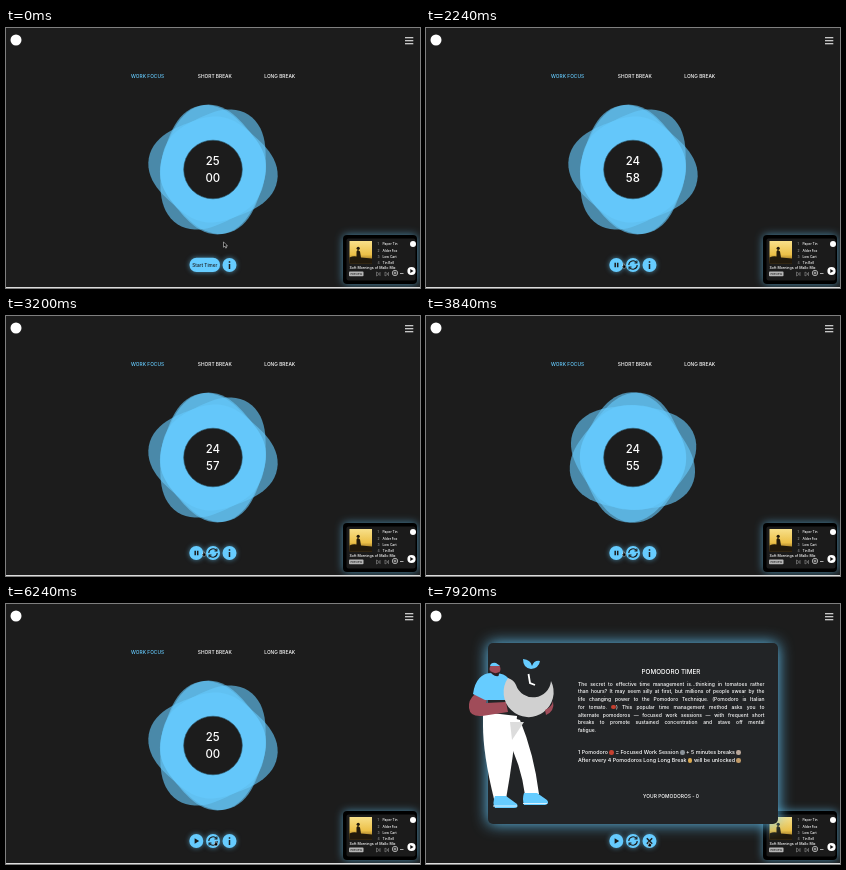
Recreate the animation shown at these times as an HTML page. Size 414x260 px, loop 8 s.

```html
<!DOCTYPE html>
<html lang="en">
<head>
<meta charset="utf-8">
<title>Pomodoro timer</title>
<style>
html, body { margin: 0; width: 100%; height: 100%; overflow: hidden; background: #1c1c1c; }
svg { position: absolute; left: 0; top: 0; }
text, #modal { font-family: Inter, "Open Sans", sans-serif; font-weight: 500; }
.glow { filter: drop-shadow(0 0 2.5px rgba(102, 204, 255, .6)); }
#modal {
  position: absolute; left: 62px; top: 39px; width: 290px; height: 181px; border-radius: 5px;
  background: #222426; color: #fff; box-shadow: 0 0 15px rgba(102, 204, 255, .95);
}
#modal div { position: absolute; white-space: nowrap; }
#modal p { margin: 0; height: 7.7px; text-align-last: justify; }
#modal p:last-child { text-align-last: left; }
#copy { left: 90px; top: 37.8px; width: 186.5px; font-size: 5px; line-height: 7.7px; }
#rules { left: 90px; top: 106.3px; font-size: 5.35px; line-height: 7.7px; }
.mid { left: 90px; width: 186px; text-align: center; }
i { display: inline-block; width: 4.6px; height: 4.4px; border-radius: 50%; vertical-align: -.5px; }
</style>
</head>
<body>
<svg width="414" height="260" viewBox="0 0 414 260">
  <defs>
    <linearGradient id="dusk" x2="0" y2="1">
      <stop offset="0" stop-color="#f8e08a"/><stop offset=".6" stop-color="#ecc048"/><stop offset="1" stop-color="#6b4a12"/>
    </linearGradient>
    <filter id="halo" x="-30%" y="-40%" width="160%" height="180%"><feGaussianBlur stdDeviation="4"/></filter>
  </defs>

  <circle cx="10" cy="12" r="5.5" fill="#fff"/>
  <path d="M399 9.7h8.3M399 12.7h8.3M399 15.7h8.3" stroke="#fff" stroke-width="1.1"/>
  <g font-size="4.85" fill="#fff">
    <text x="125" y="49.8" fill="#66ccff">WORK FOCUS</text>
    <text x="191.8" y="49.8">SHORT BREAK</text>
    <text x="258.3" y="49.8">LONG BREAK</text>
  </g>
  <g id="blob" transform="translate(207 141.5)" fill="#66ccff" fill-opacity=".62"></g>
  <circle cx="207" cy="141.5" r="29.3" fill="#1c1c1c" stroke="#2a5266" stroke-width=".6"/>
  <g font-size="11.4" fill="#fff" text-anchor="middle">
    <text id="min" x="206.8" y="137.4">25</text>
    <text id="sec" x="206.8" y="153.9">00</text>
  </g>

  <rect x="337" y="207" width="74" height="49" rx="4" fill="#66ccff" opacity=".6" filter="url(#halo)"/>
  <rect x="337" y="207" width="74" height="49" rx="4" fill="#000"/>
  <rect x="340.5" y="210.5" width="69" height="42" rx="2" fill="#1b1b1b"/>
  <rect x="343.5" y="213" width="22.5" height="22.5" fill="url(#dusk)"/>
  <path d="M343.5 235.5v-6q4-2 7-1v-5q1-3 3.500 0l1 6 11 1v5z" fill="#21190c"/>
  <circle cx="352.2" cy="220.3" r="1.6" fill="#21190c"/>
  <g id="tracks" font-size="3.3" fill="#fff"></g>
  <text x="343.5" y="241.3" font-size="3.6" font-weight="700" fill="#fff">Soft Mornings of Mallo Mix</text>
  <rect x="343" y="243.6" width="14.5" height="4.6" rx=".8" fill="#b5b5b5"/>
  <text x="350.2" y="247" font-size="2.6" fill="#222" text-anchor="middle">PREVIEW</text>
  <g stroke="#777" stroke-width=".8" fill="none">
    <path d="M370.5 244v4l3-2zM374 244v4M379 244v4l3-2zM382.5 244v4"/>
    <path d="M389 243.5v3M387.5 245h3M394 245.5h3.5" stroke="#ccc"/>
    <circle cx="389" cy="245" r="2.7" stroke="#ccc"/>
  </g>
  <circle cx="407" cy="216" r="3" fill="#fff"/>
  <circle cx="405.5" cy="243" r="4.1" fill="#fff"/>
  <path d="M404.3 241l3.2 2-3.2 2z" fill="#111"/>
  <rect y="259" width="414" height="1" fill="#dcdcdc"/>
</svg>

<div id="modal">
  <div class="mid" style="top:25px;font-size:6.3px;line-height:8px">POMODORO TIMER</div>
  <div id="copy">
    <p>The secret to effective time management is...thinking in tomatoes rather</p>
    <p>than hours? It may seem silly at first, but millions of people swear by the</p>
    <p>life changing power to the Pomodoro Technique. (Pomodoro is Italian</p>
    <p>for tomato. <i style="background:#c6402f"></i>) This popular time management method asks you to</p>
    <p>alternate pomodoros — focused work sessions — with frequent short</p>
    <p>breaks to promote sustained concentration and stave off mental</p>
    <p>fatigue.</p>
  </div>
  <div id="rules">
    1 Pomodoro <i style="background:#c6402f"></i> = Focused Work Session <i style="background:#8a9299"></i> + 5 minutes breaks <i style="background:#b9a79a"></i><br>
    After every 4 Pomodoros Long Long Break <i style="background:#d9a850"></i> will be unlocked <i style="background:#c09a68"></i>
  </div>
  <div class="mid" style="top:150px;font-size:4.95px;line-height:7px">YOUR POMODOROS - 0</div>
</div>

<svg width="414" height="260" viewBox="0 0 414 260">
  <g id="man">
    <path d="M80 112L94 116Q108 150 113 190L99 191Q95 160 80 132Z" fill="#fff"/>
    <path d="M57 108L91 112Q88 150 80 195L68 195Q57 150 57 122Z" fill="#fff"/>
    <path d="M84 118h14l-12 18z" fill="#dcdcdc"/>
    <path d="M69 192h11l11 8q2 4-3 4H69q-3-5 0-12zM98 189h13l10 7q3 4-2 5H98q-2-6 0-12z" fill="#66ccff"/>
    <path d="M67 202h24M97 199.5h24" stroke="#d9f1ff"/>
    <path d="M49 90Q42 96 43 104Q44 113 56 112L82 108L80 98L60 99L62 90Z" fill="#a04c59"/>
    <path d="M47 90Q50 69 66 69Q82 68 85 80L80 96L59 96Z" fill="#66ccff"/>
    <circle cx="69" cy="65" r="5.5" fill="#a04c59"/>
    <path d="M63.500 66q4 5 10 2l-1 4q-6 1-9-6z" fill="#2a2025"/>
    <path d="M64 62Q65 58 70 59L74 62Z" fill="#66ccff"/>
    <path d="M82 74A25 25 0 1 0 125 77A18 18 0 0 1 90 81Q88 76 82 74Z" fill="#d0d0d0"/>
    <path d="M102.5 70l1.5 9 5 2" fill="none" stroke="#fff" stroke-width="1.8"/>
    <path d="M119 106q7-3 8-9q2 10-7 14z" fill="#a04c59"/>
    <path d="M105 65Q97 64 97 55Q105 56 106 62Q108 56 114 57Q113 64 105 65Z" fill="#66ccff"/>
  </g>

  <g id="start">
    <rect class="glow" x="183.5" y="229.7" width="30.5" height="14.3" rx="7" fill="#66ccff"/>
    <text x="198.8" y="238.6" font-size="4.7" fill="#1c1c1c" text-anchor="middle">Start Timer</text>
  </g>
  <g id="run">
    <circle class="glow" cx="190.3" cy="237" r="7" fill="#66ccff"/>
    <circle class="glow" cx="207" cy="237" r="7" fill="#66ccff"/>
    <path id="pause" d="M189.2 234.7v4.6M191.7 234.7v4.6" stroke="#1c1c1c" stroke-width="1.5"/>
    <path id="play" d="M188.6 234.2l4.6 2.8-4.6 2.8z" fill="#1c1c1c"/>
    <g fill="none" stroke="#1c1c1c" stroke-width="1.1">
      <path d="M202.8 237A4.2 4.2 0 0 1 210.6 234.8M211.2 237A4.2 4.2 0 0 1 203.4 239.2"/>
      <path d="M210.9 232.6v2.4h-2.4M203.1 241.4v-2.4h2.4"/>
    </g>
  </g>
  <circle class="glow" cx="223.5" cy="237" r="7" fill="#66ccff"/>
  <g stroke="#1c1c1c" stroke-width="1.5">
    <path id="info" d="M223.5 233.2v1.5M223.5 236v5"/>
    <path id="close" d="M220.8 234.3l5.4 5.4M226.2 234.3l-5.4 5.4"/>
  </g>

  <g id="cursor" stroke="#fff" stroke-width=".5" stroke-linejoin="round">
    <path id="arrow" d="M0 0v5.200l1.300-1.100.9 2 .9-.4-.8-1.900h1.700z" fill="#000"/>
    <path id="hand" transform="scale(.7)" d="M-.6 0q.7-.7 1.300 0v2l2.500.7v2.600l-.8 1.400h-2.800l-1.800-2.600.7-.5.900.7z" fill="#000"/>
  </g>
</svg>
<script>
const $ = id => document.getElementById(id);
const NS = "http://www.w3.org/2000/svg";
const LOOP = 8000, TICK = 600;
const START = 820, SPIN = 3220, RESET = 4560, RESTART = 5400, PAUSE = 5920, OPEN = 6560;

// Rounded two-lobed outline with its long axis along x
function lobe() {
  let d = "";
  for (let a = 0; a < 360; a += 4) {
    const q = a * Math.PI / 180;
    const r = 56.5 + 6 * Math.cos(2 * q) + 2.7 * Math.cos(4 * q);
    d += (a ? "L" : "M") + (r * Math.cos(q)).toFixed(2) + " " + (r * Math.sin(q)).toFixed(2);
  }
  return d + "Z";
}

function add(parent, tag, attrs, label = "") {
  const el = document.createElementNS(NS, tag);
  for (const k in attrs) el.setAttribute(k, attrs[k]);
  el.textContent = label;
  parent.appendChild(el);
  return el;
}

// Resting angle and turn in degrees per second
const layers = [[-102, 17], [-98, 24], [10, 25], [-57, 60]].map(([angle, speed]) =>
  ({ angle, speed, el: add($("blob"), "path", { d: lobe() }) }));

["Paper Tin", "Alder Fox", "Low Cart", "Tin Bell"].forEach((name, i) => {
  const y = 217.2 + i * 6.3;
  add($("tracks"), "text", { x: 371.5, y, fill: "#999" }, i + 1);
  add($("tracks"), "text", { x: 376.5, y }, name);
});

// time, x, y
const path = [
  [0, 217.5, 214], [160, 217.5, 214], [760, 197.5, 235.5], [4200, 197.5, 235.5],
  [4500, 206, 236], [4640, 206, 236], [4960, 198.5, 236], [5500, 198.5, 236],
  [5760, 191, 236], [6000, 191, 236], [6440, 223, 238], [LOOP, 223, 238]
];

function at(t) {
  const i = path.findIndex(p => p[0] > t);
  const [a, b] = [path[i - 1], path[i]];
  let k = (t - a[0]) / (b[0] - a[0]);
  k = k * k * (3 - 2 * k);
  return [a[1] + (b[1] - a[1]) * k, a[2] + (b[2] - a[2]) * k];
}

const show = (id, on) => { $(id).style.display = on ? "" : "none"; };

function draw(t) {
  const first = t >= START && t < RESET, second = t >= RESTART;
  const spent = first ? t - START : second ? Math.min(t, PAUSE) - RESTART : 0;
  const left = 1500 - Math.floor(spent / TICK);
  $("min").textContent = Math.floor(left / 60);
  $("sec").textContent = String(left % 60).padStart(2, "0");

  const turn = t >= SPIN && t < RESET ? (t - SPIN) / 1000 : 0;
  for (const l of layers) l.el.setAttribute("transform", `rotate(${l.angle + l.speed * turn})`);

  const open = t >= OPEN, paused = t >= PAUSE;
  show("start", !first && !second);
  show("run", first || second);
  show("pause", !paused);
  show("play", paused);
  show("modal", open);
  show("man", open);
  show("info", !open);
  show("close", open);

  const [x, y] = at(t);
  $("cursor").setAttribute("transform", `translate(${x} ${y})`);
  show("arrow", y < 230);
  show("hand", y >= 230);
}

const begin = performance.now();
function loop() {
  draw((performance.now() - begin) % LOOP);
  requestAnimationFrame(loop);
}
loop();
</script>
</body>
</html>
```
